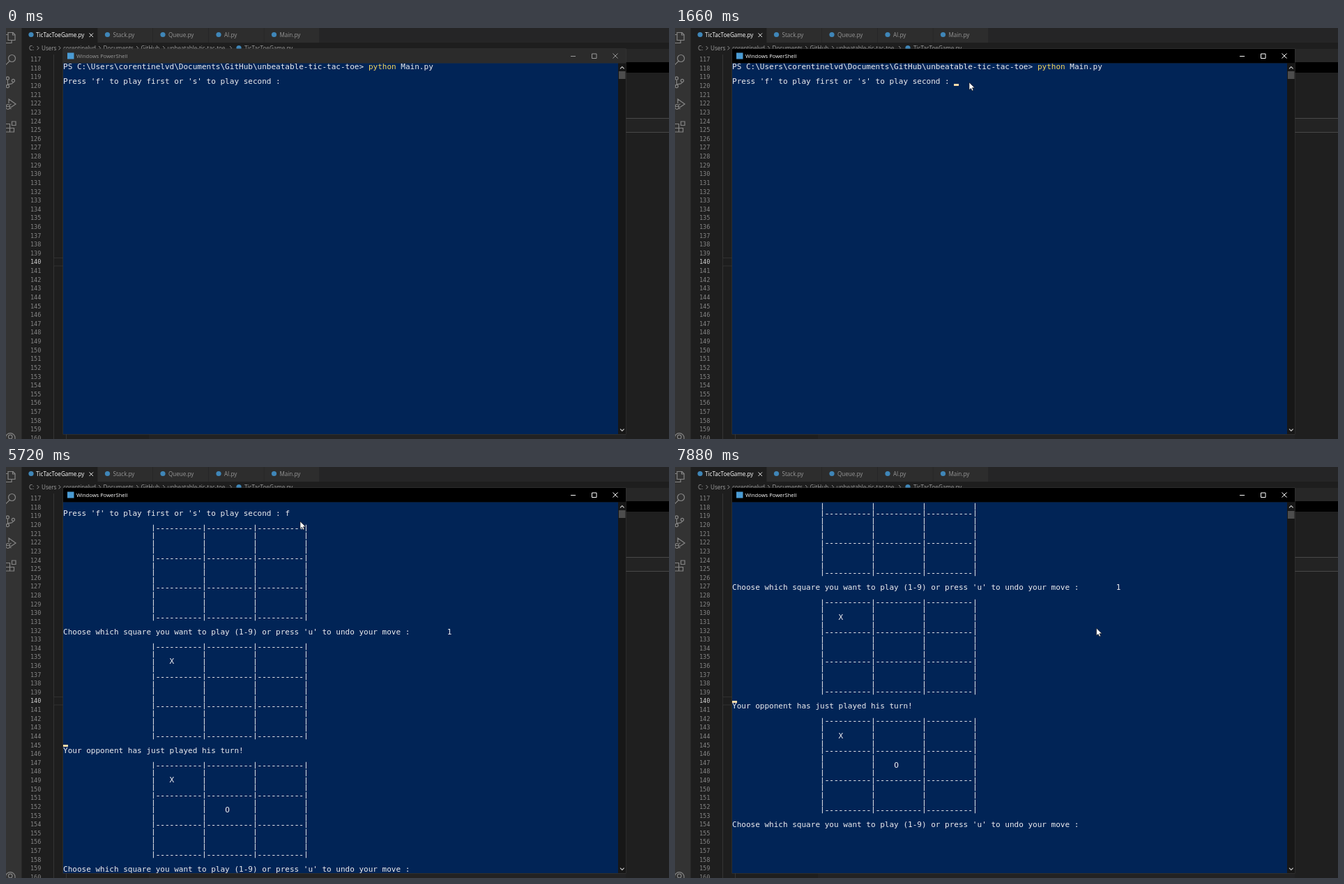
An HTML page for the animation above (8 s loop, 951 px wide and 589 px high).

```html
<!DOCTYPE html>
<html lang="en">
<head>
<meta charset="utf-8">
<title>Tic-tac-toe in a terminal</title>
<style>
  html, body { margin: 0; width: 100%; height: 100%; overflow: hidden; background: #1e1e1e; }
  svg { display: block; width: 951px; height: 589px; }
  text { white-space: pre; }
  .ui { font-family: "Open Sans", "Noto Sans", sans-serif; }
  .mono { font-family: "DejaVu Sans Mono", "Noto Sans Mono", monospace; }
  .icon { fill: none; stroke: #858585; stroke-width: 1.2; }
</style>
</head>
<body>
<svg id="stage" viewBox="0 0 951 589" xmlns="http://www.w3.org/2000/svg">
  <defs><clipPath id="screen"><rect x="82" y="51" width="796" height="531"/></clipPath></defs>
  <g id="editor"></g>
  <g id="frame"></g>
  <g clip-path="url(#screen)"><g id="doc" fill="#eeedf0"></g></g>
  <g id="top"></g>
</svg>
<script>
const LOOP = 8000, TICK = 66;
const LEFT = 82, TOP = 50.7, CELL = 6.635, ROW = 10.625;
const USER = 'corentinelvd';
const $ = id => document.getElementById(id);

function add(parent, tag, attrs, text) {
  const el = document.createElementNS('http://www.w3.org/2000/svg', tag);
  for (const k in attrs) el.setAttribute(k, attrs[k]);
  if (text !== undefined) el.textContent = text;
  return parent.appendChild(el);
}
const rect = (p, x, y, width, height, fill) => add(p, 'rect', { x, y, width, height, fill });
const dot = (p, cx, cy, r, fill) => add(p, 'circle', { cx, cy, r, fill });
const path = (p, d, attrs) => add(p, 'path', { d, ...attrs });
const label = (p, x, y, size, fill, s, cls = 'ui') =>
  add(p, 'text', { x, y, 'font-size': size, fill, class: cls }, s);

/* ---------- code editor behind the terminal ---------- */
function drawEditor() {
  const g = $('editor');
  rect(g, 0, 0, 951, 589, '#1e1e1e');
  rect(g, 22, 0, 929, 21, '#252526');

  const tabs = [[22, 'TicTacToeGame.py'], [131.5, 'Stack.py'], [211, 'Queue.py'], [291, 'AI.py'], [370.5, 'Main.py']];
  tabs.forEach(([x, name], i) => {
    const end = i < 4 ? tabs[i + 1][0] : 450;
    rect(g, x, 0, end - x - (i ? 0.7 : 0), 21, i ? '#2d2d2d' : '#1e1e1e');
    dot(g, x + 14, 9.5, 3.6, '#3f86b8');
    label(g, x + (i ? 22 : 21), 13.2, 8.1, i ? '#969696' : '#ffffff', name);
  });
  path(g, 'M119.5 7.5l5.5 5.5m0-5.5l-5.5 5.5', { stroke: '#e8e8e8' });

  const crumbs = [[33, 'C:'], [51, 'Users'], [82, USER], [139.5, 'Documents'], [193.5, 'GitHub'],
    [231.5, 'unbeatable-tic-tac-toe'], [342, 'TicTacToeGame.py']];
  crumbs.forEach(([x, s], i) => {
    label(g, x, 31.7, 8.1, '#a0a0a0', s);
    if (i) path(g, `M${x - (i === 6 ? 21 : 6.5)} 26l2.6 2.7-2.6 2.7`, { fill: 'none', stroke: '#a0a0a0', 'stroke-width': 0.9 });
  });
  dot(g, 334, 28.5, 3.6, '#3f86b8');

  rect(g, 68, 38, 1, 551, '#353535');
  rect(g, 86, 582, 1, 7, '#353535');
  rect(g, 205, 582, 746, 7, '#222223');
  path(g, 'M82 329.5H68.5V341H82', { fill: 'none', stroke: '#303030' });
  for (let n = 117; n <= 160; n++)
    label(g, 35, 48.2 + (n - 117) * 12.62, 8.5, n === 140 ? '#d0d0d0' : '#858585', n, 'mono');

  rect(g, 889, 30, 62, 19, '#272727');
  rect(g, 889, 49, 62, 15, '#000');
  rect(g, 889, 64, 62, 525, '#1f1f1f');
  rect(g, 889, 129, 62, 21, '#484848');
  rect(g, 889, 130, 62, 19, '#232323');

  rect(g, 0, 0, 22.5, 589, '#333333');
  [
    'M3 6.5h7l3 3v8H3zM9.5 6.5v3.5h3.5M3 9.5H-1v12H8v-4',
    'M13.5 43.5a5 5 0 1 1-10 0a5 5 0 1 1 10 0M5 47.5L-1 53.5',
    'M4.5 72a2.1 2.1 0 1 1-4.2 0a2.1 2.1 0 1 1 4.2 0M4.5 83.5a2.1 2.1 0 1 1-4.2 0a2.1 2.1 0 1 1 4.2 0' +
      'M12.5 75.5a2.1 2.1 0 1 1-4.2 0a2.1 2.1 0 1 1 4.2 0M2.4 74v7.4M10.4 77.6q0 3-8 3',
    'M4 108V102L14 109L6.5 114M5.5 113a2.8 3.5 0 1 1-5.6 0a2.8 3.5 0 1 1 5.6 0M0 112.5h5.5M0 110l-2-1M5.5 110l2-1M5.5 115l2 1',
    'M8.5 134h5.5v5.5H8.5zM-1 137.5H5.5V149H-1M-1 143.5H11.5V149H5.5',
    'M13 587.5a6.8 6.8 0 1 1-13.6 0a6.8 6.8 0 1 1 13.6 0M9 586a2.8 2.8 0 1 1-5.6 0a2.8 2.8 0 1 1 5.6 0'
  ].forEach(d => path(g, d, { class: 'icon' }));
}

/* ---------- terminal window ---------- */
let bar, title, buttons, thumb;
function drawFrame() {
  const g = $('frame');
  rect(g, 81.5, 29.5, 808, 553, '#3b3b3b');
  bar = rect(g, 82, 30, 807, 20.7, '#2b2b2b');
  rect(g, 88, 35.5, 9.5, 9, '#4a9bd4');
  title = label(g, 101, 43, 7.6, '#999', 'Windows PowerShell');
  buttons = path(g, 'M810 40.5h7M840.5 37h6.5v6.5h-6.5zM870.5 36.5l7 7m0-7l-7 7', { fill: 'none' });
  rect(g, 82, 50.5, 796, 531.5, '#012456');
  rect(g, 878, 50.5, 11, 531.5, '#171717');
  path(g, 'M881 58.3l2.8-2.8 2.8 2.8M881 574.7l2.8 2.8 2.8-2.8', { fill: 'none', stroke: '#c8c8c8', 'stroke-width': 1.2 });
  thumb = rect(g, 879, 62, 9.5, 11, '#4d4d4d');
}

/* ---------- terminal text, each part with the time it shows up ---------- */
const parts = [];
const baseline = line => 59.2 + line * ROW;
const colX = col => LEFT + col * CELL;

function part(from) {
  const g = add($('doc'), 'g', {});
  parts.push([g, from]);
  return g;
}
function write(g, line, col, s, fill = '#eeedf0') {
  return label(g, colX(col), baseline(line), 11.02, fill, s, 'mono');
}
function board(from, first, marks) {
  const g = part(from), dashes = '-'.repeat(10);
  const rules = add(g, 'g', { stroke: '#eeedf0', 'stroke-width': 0.3 });
  for (let r = 0; r < 13; r++) {
    for (let c = 19; c <= 52; c += 11)
      add(rules, 'text', { x: colX(c + 0.5), y: baseline(first + r) - 0.6, 'font-size': 9,
        'text-anchor': 'middle', class: 'mono' }, '|');
    if (r % 4 === 0) write(rules, first + r, 20, [dashes, dashes, dashes].join(' '));
  }
  for (const [r, c, s] of marks) write(g, first + r, c, s);
}
function drawText() {
  const ask = "Choose which square you want to play (1-9) or press 'u' to undo your move :";
  const intro = part(0);
  write(intro, 0, 0, `PS C:\\Users\\${USER}\\Documents\\GitHub\\unbeatable-tic-tac-toe>`);
  write(intro, 0, 66, 'python', '#f6d55c');
  write(intro, 0, 73, 'Main.py');
  write(intro, 2, 0, "Press 'f' to play first or 's' to play second :");
  write(part(2250), 2, 48, 'f');
  board(2650, 4, []);
  write(part(2650), 18, 0, ask);
  write(part(3990), 18, 83, '1');
  board(4320, 20, [[2, 23, 'X']]);
  write(part(5650), 34, 0, 'Your opponent has just played his turn!');
  board(5650, 36, [[2, 23, 'X'], [6, 35, 'O']]);
  write(part(5650), 50, 0, ask);
}

/* ---------- timeline ---------- */
// time, line, column (no place = hidden)
const carets = [[0], [1530, 2, 48], [2070], [2250, 2, 49], [2580], [2650, 18, 83], [3660],
  [3990, 18, 84], [4190], [4320, 33, 0], [5250], [6270, 50, 83], [6670], [7140, 50, 83], [7880]];
const scrolls = [[0, 0], [5720, 1], [6670, 4], [6810, 7]];
// time, x, y
const moves = [[66, 904, 580], [790, 411, 77], [1254, 411, 77], [1650, 422, 78], [6404, 422, 78],
  [6666, 470, 84], [7200, 579, 200], [7280, 579, 200], [7526, 604.5, 231]];

const at = (table, t) => table.filter(k => k[0] <= t).pop();

function pointer(t) {
  const q = Math.floor((t + 4) / TICK) * TICK;
  const i = moves.findIndex(m => m[0] > q);
  if (i < 0) return moves[moves.length - 1].slice(1);
  if (i === 0) return null;
  const [t0, x0, y0] = moves[i - 1], [t1, x1, y1] = moves[i];
  let u = (q - t0) / (t1 - t0);
  if (i === 1) u = 1 - (1 - u) ** 2;
  return [x0 + (x1 - x0) * u, y0 + (y1 - y0) * u];
}

let caret, ghost, click, arrow;
function drawTop() {
  const g = $('top');
  caret = rect(g, 0, 0, 7, 3, '#fedba9');
  ghost = rect(g, 0, 0, 7, 3, '#fedba9');
  click = dot(g, 411.3, 76.6, 8.2, '#8b8a2a');
  arrow = path(g, 'M0 0V10.6L2.5 8.4L4.2 12L6 11.2L4.4 7.7H7.8Z',
    { fill: '#fff', stroke: '#111', 'stroke-width': 0.6 });
}
const show = (el, on) => el.setAttribute('visibility', on ? 'visible' : 'hidden');
function place(el, line, col, scroll) {
  el.setAttribute('x', Math.round(colX(col) - 0.1));
  el.setAttribute('y', Math.round(TOP + (line + 1 - scroll) * ROW) - 3);
}

function render(t) {
  const active = t >= 990, ink = active ? '#fff' : '#999';
  bar.setAttribute('fill', active ? '#000' : '#2b2b2b');
  title.setAttribute('fill', ink);
  buttons.setAttribute('stroke', ink);

  const scroll = at(scrolls, t)[1];
  $('doc').setAttribute('transform', `translate(0 ${-scroll * ROW})`);
  thumb.setAttribute('y', scroll > 4 ? 63 : 62);
  for (const [g, from] of parts) show(g, t >= from);

  const [, line, col] = at(carets, t);
  show(caret, line !== undefined);
  if (line !== undefined) place(caret, line, col, scroll);
  show(ghost, t >= 5650);
  place(ghost, 33, 0, scroll);

  show(click, t >= 990 && t < 1130);
  const p = pointer(t);
  show(arrow, p);
  if (p) arrow.setAttribute('transform', `translate(${p[0]} ${p[1]})`);
}

drawEditor();
drawFrame();
drawText();
drawTop();
const start = performance.now();
function loop() {
  render((performance.now() - start) % LOOP);
  requestAnimationFrame(loop);
}
loop();
</script>
</body>
</html>
```
